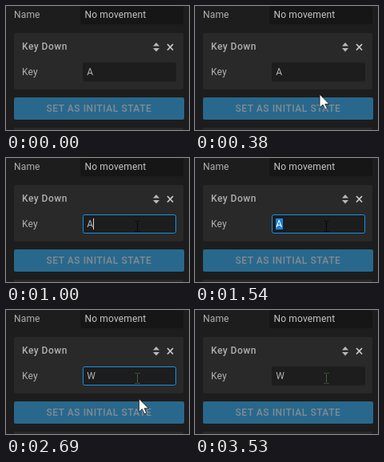
Animation of 229x156 px, one loop 3.61 s. Source, as an HTML page:

```html
<!DOCTYPE html>
<html>
<head>
<meta charset="utf-8">
<style>
html, body { margin: 0; width: 100%; height: 100%; overflow: hidden; background: #1d1d1d; }
svg { display: block; }
text { font: 12px Roboto, sans-serif; fill: #b0b0b0; letter-spacing: .15px; white-space: pre; }
.title { font-weight: 500; letter-spacing: .5px; }
.button { font-weight: 500; letter-spacing: .55px; fill: #858b8e; }
</style>
</head>
<body>
<svg width="229" height="156" viewBox="0 0 229 156">
  <rect x="93" y="-4" width="129" height="27" rx="2" fill="#161616"/>
  <text x="10" y="15">Name</text>
  <text x="98.5" y="15" style="fill:#c4c4c4">No movement</text>

  <rect x="10" y="34" width="212" height="71" rx="2" fill="#292929"/>
  <text class="title" x="20" y="55">Key Down</text>
  <path d="M184 50.5L188 46L192 50.5ZM184 53L188 57.5L192 53Z" fill="#b8b8b8"/>
  <path d="M202 48L209 55.5M209 48L202 55.5" stroke="#c8c8c8" stroke-width="1.8"/>
  <text x="20" y="87">Key</text>

  <rect x="96.5" y="71.5" width="116" height="23" rx="2" fill="#1d1d1d" id="field"/>
  <rect x="101" y="76" width="9" height="14" fill="#1683d8" id="mark"/>
  <text x="101.3" y="87" id="value">A</text>
  <rect y="76" width="1" height="14" fill="#d8d8d8" id="caret"/>

  <rect x="10" y="115" width="213" height="28" rx="2" fill="#29688d"/>
  <text class="button" x="50.5" y="133">SET AS INITIAL STATE</text>
  <rect x="10" y="153" width="212" height="6" rx="2" fill="#292929"/>

  <path d="M-3 -6.5H-1L0 -5.5L1 -6.5H3M0 -5.5V5.5M-3 6.5H-1L0 5.5L1 6.5H3" fill="none" id="beam"/>
  <path d="M0 .5V17L4 13.4L6.8 19.5L9.4 18.3L6.8 12.6H12Z" fill="#fff" stroke="#111" stroke-width=".8" id="arrow"/>
</svg>
<script>
const LOOP = 3610, STEP = 77.5;
const ENTER = 70, HOVER = 610, FOCUS = 1000, SELECT = 1540, TYPE = 2000;
const LEAVE = 2530, GONE = 2990, BLUR = 3530, BLINK = 530;

const $ = id => document.getElementById(id);
const set = (id, name, value) => $(id).setAttribute(name, value);
const show = (id, on) => set(id, 'visibility', on ? 'visible' : 'hidden');
const move = (id, x, y) => set(id, 'transform', `translate(${x} ${y})`);
const within = (t, a, b) => t >= a && t < b;
// Progress from 0 to 1 in a number of equal jumps
const steps = (t, from, count) => Math.min(1, Math.max(0, Math.floor((t - from) / STEP) / count));

function drawPointer(t) {
  const exit = steps(t, LEAVE, 5);
  const leaving = exit > 0;
  show('arrow', within(t, ENTER, HOVER) || leaving && t < GONE);
  if (leaving) {
    move('arrow', 164 + 6 * exit, 86 + 63 * exit);
  } else {
    const p = steps(t, ENTER, 6);
    move('arrow', 148 + 16 * p ** 1.7, 100 + 50 * (1 - p) ** 1.4);
  }

  show('beam', t >= HOVER);
  move('beam', 164.5, 86 + 8 * (1 - steps(t, HOVER, 4)) ** 2);
  set('beam', 'stroke', leaving ? '#3a6042' : '#070707');
}

function drawField(t) {
  const typed = t >= TYPE;
  const focused = within(t, FOCUS, BLUR);
  const selected = within(t, SELECT, TYPE);
  const blinkOn = Math.floor((t - (typed ? TYPE : FOCUS)) / BLINK) % 2 === 0;
  $('value').textContent = typed ? 'W' : 'A';
  set('value', 'style', selected ? 'fill:#fff' : '');
  set('field', 'stroke', focused ? '#1593e6' : '#1d1d1d');
  show('mark', selected);
  set('caret', 'x', typed ? 113 : 109);
  show('caret', focused && !selected && (blinkOn || t >= GONE));
}

const start = performance.now();
function tick() {
  const t = (performance.now() - start) % LOOP;
  drawPointer(t);
  drawField(t);
  requestAnimationFrame(tick);
}
tick();
</script>
</body>
</html>
```
